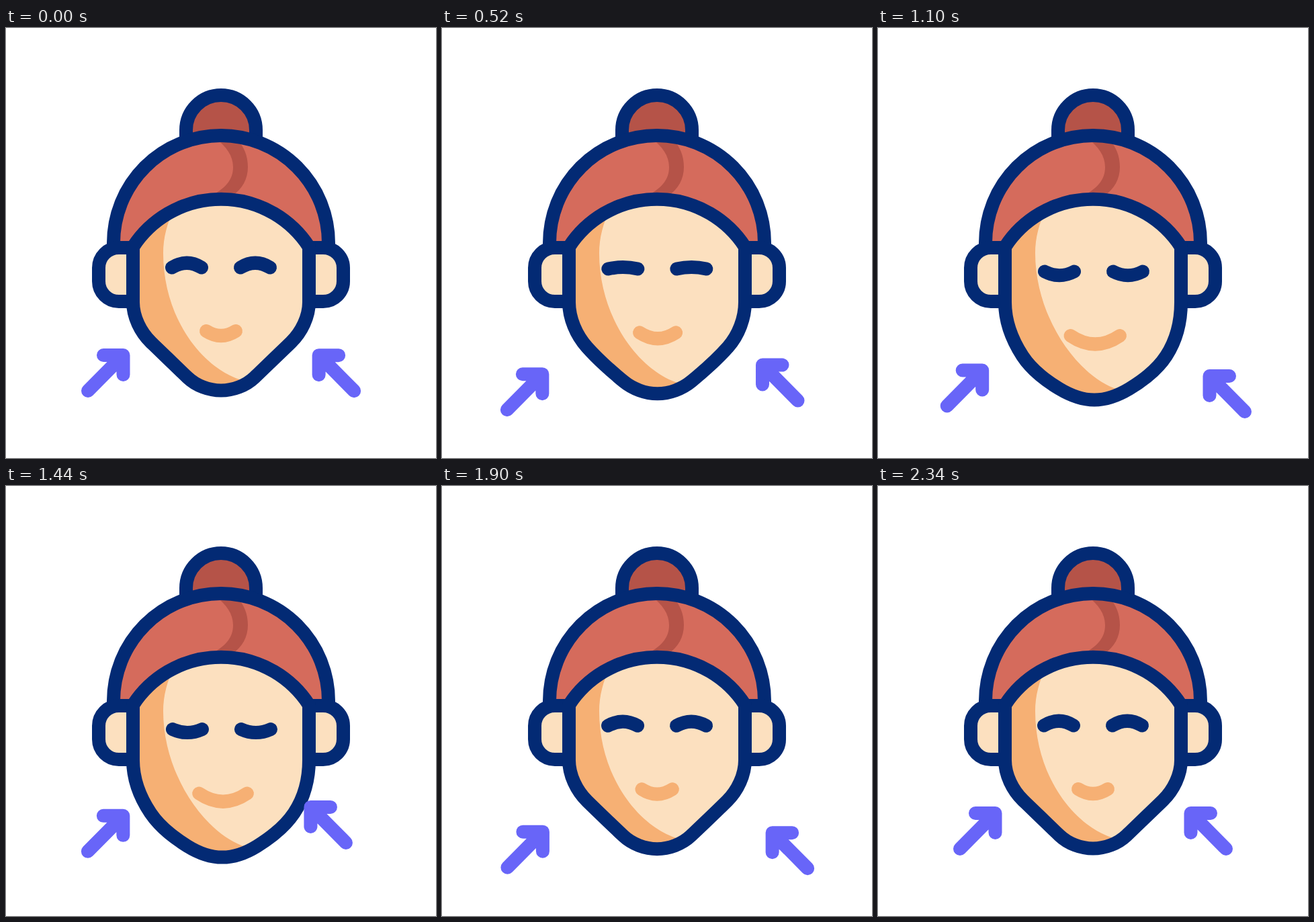
These frames come from a looping animation (640x640 px, 2.4 s). An HTML page:

```html
<!DOCTYPE html>
<html lang="en">
<head>
<meta charset="utf-8">
<title>Face massage</title>
<style>
  html, body { margin: 0; width: 100%; height: 100%; overflow: hidden; background: #fff; }
  svg { display: block; width: 100vw; height: 100vh; }
  .line { fill: none; stroke: #032a74; stroke-width: 20; stroke-linejoin: round; }
  .round { stroke-linecap: round; }
  .skin { fill: #fce0bf; }
  .mouth { stroke: #f6b074; }
  .arrow { stroke: #6865f8; }
</style>
</head>
<body>
<svg viewBox="0 0 640 640">
  <defs>
    <clipPath id="faceClip"><path id="clipShape"/></clipPath>
    <path id="arrowShape" d="M122 540L174.500 487M145 487H174.500V516"/>
    <path id="ear" d="M190 327H168A30 30 0 0 0 138 357V377A30 30 0 0 0 168 407H190"/>
  </defs>
  <path class="line" d="M268 166V152A52 52 0 0 1 372 152V166" style="fill:#b55348"/>
  <path d="M160 322A160 162 0 0 1 480 322Z" fill="#d56b5c"/>
  <path d="M312 164C328 177 338 190 338 207C338 225 328 236 312 246L336 250C352 240 360 224 360 207C360 190 354 176 344 166Z" fill="#b55348"/>
  <path class="line" d="M160 327V320A160 160 0 0 1 480 320V327"/>
  <use href="#ear" class="line" style="fill:#fce0bf"/>
  <use href="#ear" class="line" style="fill:#fce0bf" transform="matrix(-1 0 0 1 640 0)"/>
  <path id="face" class="skin"/>
  <path id="shade" fill="#f6b074" clip-path="url(#faceClip)"/>
  <path id="outline" class="line"/>
  <path id="eyeL" class="line round"/>
  <path id="eyeR" class="line round"/>
  <path id="mouth" class="line round mouth"/>
  <g id="arrowL"><use href="#arrowShape" class="line round arrow"/></g>
  <g id="arrowR"><use href="#arrowShape" class="line round arrow" transform="matrix(-1 0 0 1 640 0)"/></g>
</svg>
<script>
const LOOP = 2400, END = 2340;
const el = id => document.getElementById(id);
const mix = (a, b, k) => a + (b - a) * k;
const clamp = v => Math.min(1, Math.max(0, v));
const draw = (id, d) => el(id).setAttribute('d', d);

// Steep ease: cubic-bezier(.833, 0, .167, 1)
function steep(x) {
  let lo = 0, hi = 1;
  for (let i = 0; i < 24; i++) {
    const s = (lo + hi) / 2, r = 1 - s;
    if (2.5 * r * r * s + 0.5 * r * s * s + s * s * s < clamp(x)) lo = s; else hi = s;
  }
  return lo * lo * (3 - 2 * lo);
}

// Swings from rest to far, near, far ... and back to rest at END
function swing(id, t, { start, half, turns, far, near }) {
  const rest = { x: 0, y: 0 };
  const stop = i => i === 0 || i > turns ? rest : i % 2 ? far : near;
  const i = Math.min(turns, Math.max(0, Math.floor((t - start) / half)));
  const from = start + i * half, to = i === turns ? END : from + half;
  const k = (1 - Math.cos(Math.PI * clamp((t - from) / (to - from)))) / 2;
  const a = stop(i), b = stop(i + 1);
  el(id).setAttribute('transform', `translate(${mix(a.x, b.x, k)} ${mix(a.y, b.y, k)})`);
}

const left = { start: 80, half: 378, turns: 5, far: { x: -28, y: 31 }, near: { x: 14.5, y: -10.5 } };
const right = { start: -15, half: 373, turns: 6, far: { x: 28, y: 31 }, near: { x: -13, y: -10 } };

// Half of the jaw from cheek to chin: distance from the middle, height, direction
function jawPoints(k) {
  return [
    { x: 131, y: 408, a: 90 },
    { x: mix(104, 107, k), y: mix(468, 488, k), a: mix(44, 57, k) },
    { x: mix(50, 52, k), y: mix(520, 537, k), a: mix(44, 31, k) },
    { x: 0, y: mix(539.5, 553.5, k), a: 0 }
  ];
}

// Cubic segments whose handles are a third of the chord
function curve(points) {
  return points.slice(1).map((q, i) => {
    const p = points[i], h = Math.hypot(q.x - p.x, q.y - p.y) / 3;
    const hand = (n, len) => {
      const a = n.a * Math.PI / 180;
      return `${n.x + len * Math.cos(a)} ${n.y + len * Math.sin(a)}`;
    };
    return `C${hand(p, h)} ${hand(q, -h)} ${q.x} ${q.y}`;
  }).join('');
}

function drawFace(k) {
  const half = jawPoints(k), mid = 320 + 2 * k;
  const place = side => p => ({ x: p.y === 408 ? 320 + side * p.x : mid + side * p.x, y: p.y, a: -side * p.a });
  const points = [...half.map(place(-1)), ...half.slice(0, -1).reverse().map(place(1))];
  const shape = `M189 326V408${curve(points)}V326A156 156 0 0 0 189 326Z`;
  for (const id of ['face', 'clipShape', 'outline']) draw(id, shape);

  const x = mix(350, 357, k), y = mix(524, 538, k);
  draw('shade', `M250 270C240 290 234 312 234 335C234 430 ${x - 60} ${y - 19} ${x} ${y}V600H150V270Z`);
}

function drawFeatures(k) {
  const y = mix(356.5, 362.5, k), bend = mix(343, 374, k);
  const eye = x => `M${x + k} ${y}q22 ${bend - y} 44 0`;
  draw('eyeL', eye(247));
  draw('eyeR', eye(349));

  const x1 = mix(298, 286.5, k), x2 = mix(342, 360, k), my = mix(451, 458, k);
  draw('mouth', `M${x1} ${my}Q${(x1 + x2) / 2} ${mix(465, 483, k)} ${x2} ${my}`);
}

function render(t) {
  const k = steep(t / 1110) - steep((t - 1150) / 1010);
  drawFace(k);
  drawFeatures(k);
  swing('arrowL', t, left);
  swing('arrowR', t, right);
}

const start = performance.now();
function tick() {
  render((performance.now() - start) % LOOP);
  requestAnimationFrame(tick);
}
tick();
</script>
</body>
</html>
```
